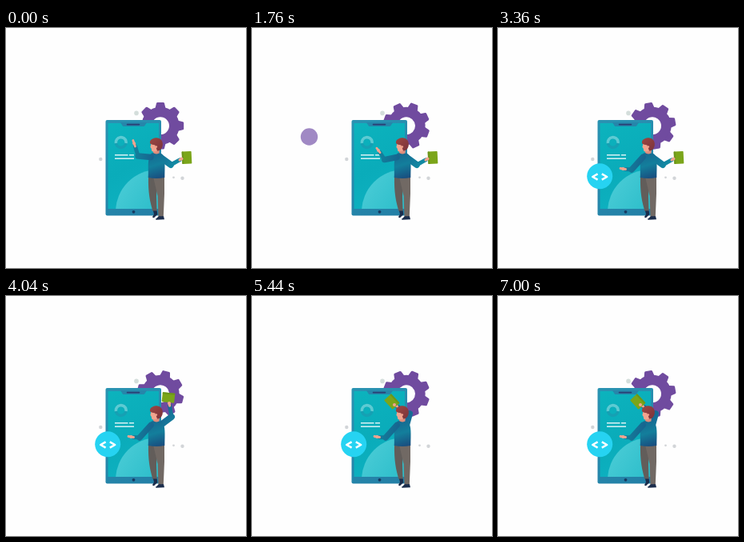
An HTML page with a canvas for the animation above (7.04 s loop, 300x300 px).

```html
<!DOCTYPE html>
<html lang="en">
<head>
<meta charset="utf-8">
<title>App building</title>
<style>
html, body { margin: 0; width: 100%; height: 100%; overflow: hidden; background: #fefefe; }
canvas { display: block; width: 300px; height: 300px; }
</style>
</head>
<body>
<canvas id="stage"></canvas>
<script>
const LOOP = 7040, STEP = 40;
const canvas = document.getElementById('stage');
const dpr = window.devicePixelRatio || 1;
canvas.width = canvas.height = 300 * dpr;
const ctx = canvas.getContext('2d');

const SKIN = '#f2a48f', PURPLE = [160, 137, 196], CYAN = [38, 211, 242];

// Rows are [time, value, value, ...]; "flow" glides through, otherwise each key eases to rest.
function track(rows, t, flow) {
  const last = rows.length - 1;
  if (t <= rows[0][0]) return rows[0].slice(1);
  if (t >= rows[last][0]) return rows[last].slice(1);
  let i = 0;
  while (t >= rows[i + 1][0]) i++;
  const a = rows[i], b = rows[i + 1], d = b[0] - a[0], u = (t - a[0]) / d;
  const slope = (k, j) => !flow || k === 0 || k === last ? 0 :
    (rows[k + 1][j] - rows[k - 1][j]) / (rows[k + 1][0] - rows[k - 1][0]);
  const s = u * u * (3 - 2 * u);
  return a.slice(1).map((v, n) => v + (b[n + 1] - v) * s +
    d * (u * (1 - u) * (1 - u) * slope(i, n + 1) - u * u * (1 - u) * slope(i + 1, n + 1)));
}

const ease = (t, from, to) => track([[from, 0], [to, 1]], t)[0];

function disc(x, y, r, fill) {
  ctx.beginPath();
  ctx.arc(x, y, Math.max(r, 0), 0, 7);
  ctx.fillStyle = fill;
  ctx.fill();
}

function box(x, y, w, h, r, fill) {
  ctx.beginPath();
  ctx.roundRect(x, y, w, h, r);
  ctx.fillStyle = fill;
  ctx.fill();
}

function shape(d, fill) {
  ctx.fillStyle = fill;
  ctx.fill(new Path2D(d));
}

function stroke(points, width, color, cap = 'round') {
  ctx.beginPath();
  points.forEach(p => ctx.lineTo(p[0], p[1]));
  ctx.lineWidth = width;
  ctx.strokeStyle = color;
  ctx.lineCap = cap;
  ctx.lineJoin = 'round';
  ctx.stroke();
}

function arc(x, y, r, from, to, width, color) {
  ctx.beginPath();
  ctx.arc(x, y, r, from, to);
  ctx.lineWidth = width;
  ctx.strokeStyle = color;
  ctx.lineCap = 'butt';
  ctx.stroke();
}

function blend(x0, y0, x1, y1, ...colors) {
  const g = ctx.createLinearGradient(x0, y0, x1, y1);
  colors.forEach((c, i) => g.addColorStop(i / (colors.length - 1), c));
  return g;
}

function gear(t) {
  const color = '#704b9f';
  ctx.save();
  ctx.translate(193, 122.3);
  ctx.rotate(t * 0.0371 * Math.PI / 180);
  arc(0, 0, 17.3, 0, 7, 12.6, color);
  for (let i = 0; i < 8; i++) {
    ctx.rotate(Math.PI / 4);
    shape('M-6.5-22 L-5-28 Q-4.7-29.2-3.6-29.2 L3.6-29.2 Q4.7-29.2 5-28 L6.5-22Z', color);
  }
  ctx.restore();
}

function phone() {
  box(124.5, 115, 69.5, 119.5, 2, blend(124, 115, 194, 235, '#2a93b2', '#237fa6'));
  ctx.save();
  ctx.beginPath();
  ctx.rect(127.5, 119, 63.5, 107);
  ctx.clip();
  box(127, 119, 65, 108, 0, blend(130, 119, 185, 226, '#0cb3bd', '#0aacba', '#0fb2c2'));
  disc(190, 230, 53, blend(140, 190, 190, 226, '#4accd6', '#2cbdca'));
  ctx.restore();
  shape('M143 118 L176 118 L173.5 122 Q173 123 172 123 L147 123 Q146 123 145.5 122Z', '#2686aa');
  stroke([[151.5, 120.6], [166.5, 120.6]], 1.6, '#2b3c72');
  disc(159.5, 229.8, 1.9, '#173a61');

  arc(143.7, 143, 6.4, 0, 7, 3.6, '#16a0b3');
  arc(143.7, 143, 6.4, Math.PI * 0.95, Math.PI * 2.05, 3.6, '#5ccbd3');
  const white = 'rgba(255,255,255,.85)';
  stroke([[136, 158.8], [152.5, 158.8]], 1.5, white, 'butt');
  stroke([[154, 158.8], [160, 158.8]], 1.5, white, 'butt');
  stroke([[136, 163.2], [160, 163.2]], 1.5, white, 'butt');
}

const flight = [
  [760, 100.3, 234, 10.2], [1120, 97.3, 188, 10.3], [1440, 86, 160, 10.4],
  [1760, 71.5, 136, 10.7], [2200, 99, 108.5, 11], [2360, 102.3, 105.2, 11],
  [2920, 117, 140, 13], [3300, 127.2, 185.2, 16]
];

function badge(t) {
  const [x, y, size] = track(flight, t, true);
  const r = size * ease(t, 200, 600);
  if (r <= 0) return;
  const hole = track([[1900, 0], [2300, 4], [2450, 4], [2750, 0]], t)[0];
  const mix = ease(t, 2600, 3100);
  const color = `rgb(${PURPLE.map((v, i) => Math.round(v + (CYAN[i] - v) * mix))})`;
  disc(x, y, r, color);
  if (hole > 0) disc(x, y, hole, '#fefefe');
  const show = ease(t, 2900, 3200);
  if (show <= 0) return;
  ctx.save();
  ctx.translate(x, y + 0.8);
  ctx.scale(show, show);
  for (const s of [-1, 1])
    stroke([[s * 2.6, -3.7], [s * 9, 0], [s * 2.6, 3.7]], 2.5, '#fff', 'butt');
  ctx.restore();
}

// elbow x, y, wrist x, y, fingertip x, y
const pointing = [
  [1400, 165, 160, 161.5, 148, 158.8, 140.5],
  [2300, 166.5, 173, 157.5, 170, 150.5, 168],
  [2960, 167, 177, 159.5, 176.5, 153, 175.5]
];

// elbow x, y, hand x, y, card x, y, card angle
const carrying = [
  [3560, 206, 171, 219.5, 163.5, 226, 162, -0.05],
  [4040, 207, 151, 204, 134, 203, 127, 1.68],
  [4620, 197, 147, 178, 136, 174.8, 132, 2.4]
];

function limb(points, wide, narrow, fill) {
  const [a, b, c] = points;
  stroke([a, b], wide, fill);
  stroke([b, c], narrow, fill);
}

function cardArm(t) {
  const [ex, ey, hx, hy, cx, cy, turn] = track(carrying, t, true);
  const wx = hx + (ex - hx) * 0.18, wy = hy + (ey - hy) * 0.18;
  limb([[193, 161.5], [ex, ey], [wx, wy]], 8, 5, blend(190, 158, 210, 172, '#176a94', '#128aa3'));
  stroke([[wx, wy], [hx, hy]], 3.2, SKIN);
  ctx.save();
  ctx.translate(cx, cy);
  ctx.rotate(turn);
  box(-6, -7.8, 12, 15.6, 0.8, '#7ba51a');
  box(-6, -7.8, 2, 15.6, 0.6, '#6b951b');
  ctx.restore();
  disc(hx, hy, 2, SKIN);
}

function pointArm(t) {
  const [ex, ey, wx, wy, fx, fy] = track(pointing, t);
  limb([[181, 161.5], [ex, ey], [wx, wy]], 7.4, 5, blend(160, 160, 184, 164, '#12819d', '#17638e'));
  stroke([[wx, wy], [fx, fy]], 2.8, SKIN);
  disc((wx + fx) / 2, (wy + fy) / 2, 1.9, SKIN);
}

function body() {
  shape('M178 186 L190 186 L188 210 L188.5 229 L183.5 229 C180 217 177.5 206 178 186Z', '#625d5a');
  shape('M184 186 L198 186 L198 207 L196.8 236 L190.5 236 L189.6 210Z', '#716964');
  shape('M184 228.5 L188.7 228.5 L189.3 233 L185 237.3 Q182.8 237.4 183.2 235.8 L185 232.8Z', '#1b2d4c');
  shape('M191 235.3 L197 235.3 L198 239.3 L188 239.8 Q186 239 188 238Z', '#1b2d4c');
  shape('M182 156.5 C186 155 191 155.5 195 157.5 C199.5 162 198.5 172 198.3 187 ' +
    'Q188 189 177.7 187 C178.7 178 175.5 163 182 156.5Z',
    blend(180, 156, 190, 188, '#17668f', '#137f9c', '#194f80'));
}

function head() {
  shape('M184.5 148 L192 148 L191.5 156.5 Q187 158.5 184 156Z', '#df8d7c');
  shape('M181.5 144 L191 144 L190 153 Q186 155.6 182.4 154 L181.6 150.5 L180.4 149Z', SKIN);
  shape('M180.2 144.6 C178.8 140 183 138.3 186 137.5 C191.5 136 196.8 140.5 195.8 146.5 ' +
    'C195 151.5 192.2 153.8 189 153.4 L187.6 149.5 L186.2 146.2 Q183 146.4 180.2 144.6Z',
    blend(181, 138, 195, 153, '#9b4641', '#7b343c'));
  disc(187.8, 148.6, 1.3, SKIN);
}

function draw(t) {
  ctx.setTransform(dpr, 0, 0, dpr, 0, 0);
  ctx.fillStyle = '#fefefe';
  ctx.fillRect(0, 0, 300, 300);
  disc(163, 106.4, 2.8, '#d4dedb');
  disc(118.3, 164, 2.2, '#d2d5d8');
  disc(209.5, 186.8, 1.4, '#d2d5d8');
  disc(220.5, 187.8, 2.2, '#d2d5d8');
  gear(t);
  phone();
  badge(t);
  cardArm(t);
  body();
  pointArm(t);
  head();
}

const start = performance.now();
function tick() {
  const t = (performance.now() - start) % LOOP;
  draw(Math.floor(t / STEP) * STEP);
  requestAnimationFrame(tick);
}
tick();
</script>
</body>
</html>
```
